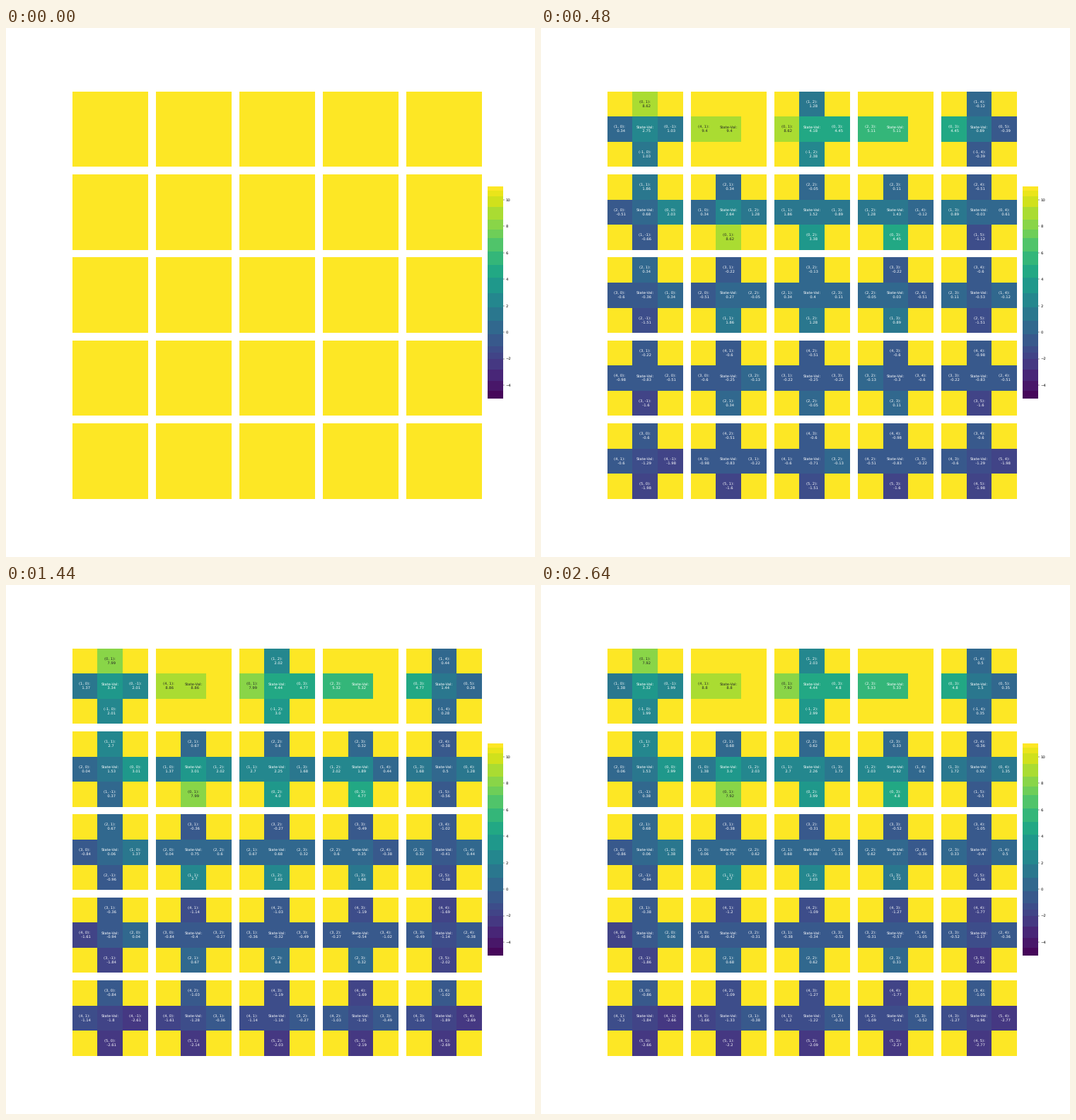
Animation, 748 px wide and 748 px high, one loop 2760 ms. Source, as a matplotlib script:

```python
import numpy as np
import matplotlib.pyplot as plt
from matplotlib.animation import FuncAnimation
from matplotlib.colors import BoundaryNorm, ListedColormap

plt.rcParams.update({
    "font.family": "DejaVu Sans",
    "font.size": 10,
    "text.hinting": "none",
})

SIZE = 5
FRAMES = 23
GAMMA = 0.9
LOW, HIGH = -5, 11
MOVES = [(0, -1), (1, 0), (0, 1), (-1, 0)]    # left, down, right, up
SLOTS = [(1, 0), (0, 1), (1, 2), (2, 1)]      # panel cells: left, top, right, bottom
JUMPS = {(0, 1): ((4, 1), 10.0), (0, 3): ((2, 3), 5.0)}

# Stepped viridis scale
EDGES = np.array([LOW, -4.43, -3.68, -2.83, -2.03, -1.55, -1.06, -0.155,
                  0.86, 1.88, 2.95, 4.12, 5.09, 6.1, 7.12, 7.76, 8.5,
                  9.45, 10.27, 10.7, HIGH])
MIDS = (EDGES[:-1] + EDGES[1:]) / 2
COLORS = plt.cm.viridis((MIDS - LOW) / (HIGH - LOW))
COLORS[-1] = plt.cm.viridis(1.0)
CMAP = ListedColormap(COLORS)
NORM = BoundaryNorm(EDGES, len(MIDS))


def inside(cell):
    return all(0 <= k < SIZE for k in cell)


def options(cell):
    """Reachable cells of a state; moves off the board come last."""
    if cell in JUMPS:
        return [JUMPS[cell][0]]
    steps = [(cell[0] + dr, cell[1] + dc) for dr, dc in MOVES]
    return sorted(steps, key=lambda step: not inside(step))


def action_value(values, cell, step):
    if cell in JUMPS:
        return JUMPS[cell][1] + GAMMA * values[step]
    if inside(step):
        return GAMMA * values[step]
    return -1 + GAMMA * values[cell]


def sweep(values):
    """One synchronous evaluation of the random policy."""
    actions = {cell: [action_value(values, cell, step) for step in options(cell)]
               for cell in values}
    return actions, {cell: sum(q) / len(q) for cell, q in actions.items()}


CELLS = [(r, c) for r in range(SIZE) for c in range(SIZE)]
history = []
state = {cell: 0.0 for cell in CELLS}
for _ in range(FRAMES - 1):
    actions, state = sweep(state)
    history.append((actions, state))

fig, axes = plt.subplots(SIZE, SIZE, figsize=(20, 20), dpi=37.4,
                         facecolor="white",
                         gridspec_kw={"wspace": 0.1, "hspace": 0.1})


class Panel:
    def __init__(self, ax, cell):
        self.cell = cell
        self.names = [f"({r}, {c})" for r, c in options(cell)] + ["State-Val"]
        self.slots = SLOTS[:len(self.names) - 1] + [(1, 1)]
        self.mesh = ax.pcolormesh(np.full((3, 3), HIGH), cmap=CMAP, norm=NORM)
        self.texts = [ax.text(c + 0.5, r + 0.5, "", ha="center", va="center")
                      for r, c in self.slots]
        ax.set(xlim=(0, 3), ylim=(3, 0))
        ax.axis("off")

    def clear(self):
        self.mesh.set_array(np.full((3, 3), HIGH))
        for text in self.texts:
            text.set_text("")

    def show(self, actions, state):
        grid = np.full((3, 3), float(HIGH))
        numbers = actions[self.cell] + [state[self.cell]]
        for slot, name, value, text in zip(self.slots, self.names,
                                           numbers, self.texts):
            grid[slot] = value
            text.set_text(f"{name}:\n  {round(value, 2)}")
            text.set_color("0.15" if value > 6.1 else "white")
        self.mesh.set_array(grid)


def draw_scale():
    cax = fig.add_axes([0.91, 0.3, 0.03, 0.4])
    cax.pcolormesh([0, 1], EDGES, MIDS[:, None], cmap=CMAP, norm=NORM)
    cax.set(xticks=[], yticks=range(-4, 11, 2), ylim=(LOW, HIGH))
    cax.yaxis.tick_right()
    cax.spines[:].set_visible(False)


panels = [Panel(axes[cell], cell) for cell in CELLS]
draw_scale()


def update(i):
    for panel in panels:
        if i == 0:
            panel.clear()
        else:
            panel.show(*history[i - 1])
    return []


anim = FuncAnimation(fig, update, frames=FRAMES, interval=120,
                     init_func=lambda: update(0), repeat=True, repeat_delay=0)
plt.show()
```
